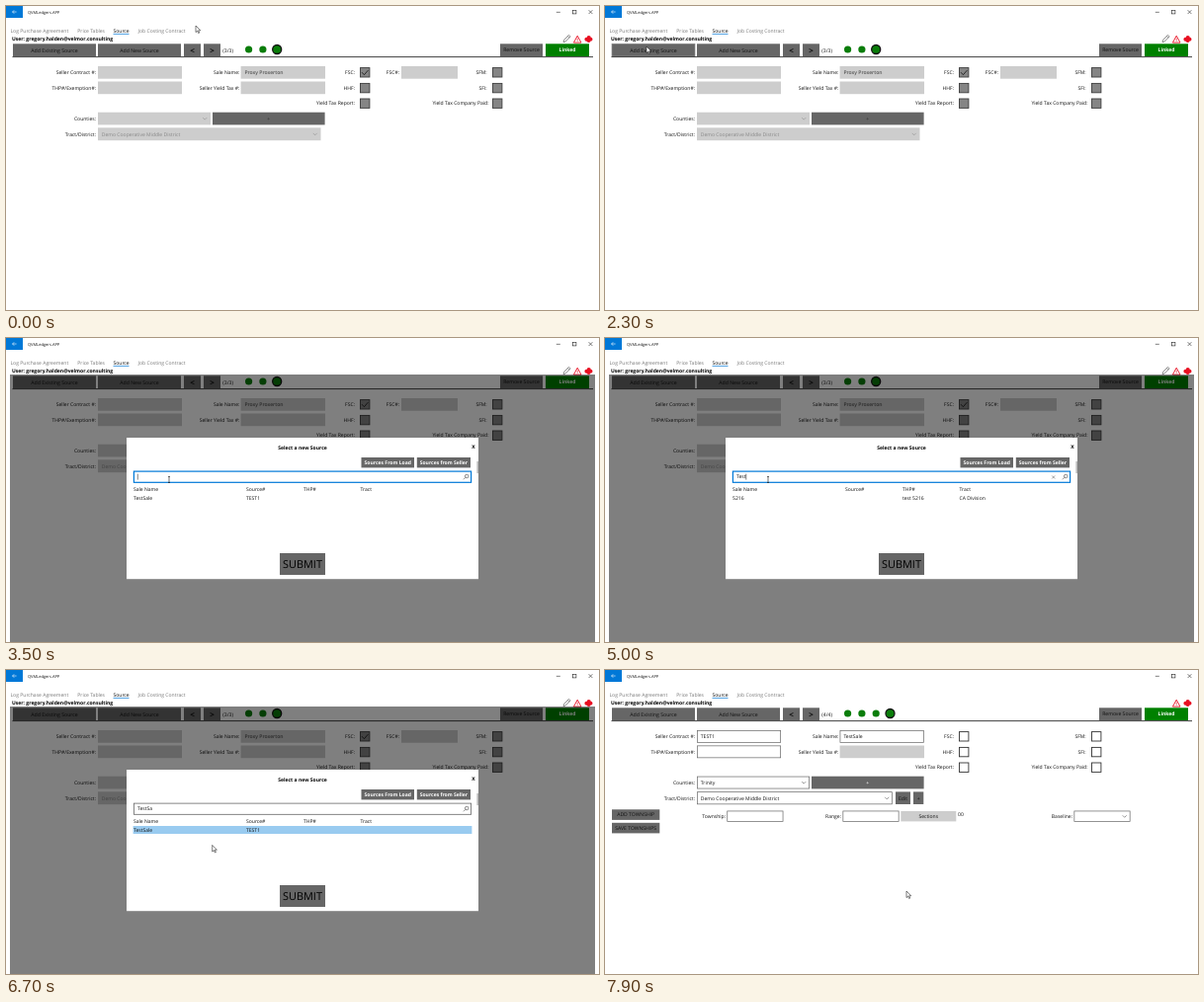
These frames come from a looping animation (600 px wide and 308 px high, 8000 ms). An HTML page:

```html
<!DOCTYPE html>
<html lang="en">
<head>
<meta charset="utf-8">
<title>Source form</title>
<style>
html, body { margin: 0; width: 100%; height: 100%; overflow: hidden; background: #fff; }
svg { display: block; width: 600px; height: 308px; }
text { font: 5.05px "Open Sans", "Noto Sans", sans-serif; text-rendering: geometricPrecision; white-space: pre; }
</style>
</head>
<body>
<svg id="stage" viewBox="0 0 600 308"></svg>
<script>
const NS = 'http://www.w3.org/2000/svg';
const stage = document.getElementById('stage');
const LOOP = 8000, STEP = 100;
const BTN = '#666', OFF = '#cdcdcd', BLUE = '#0078d7', GREEN = '#008000', RED = '#e81123';

function el(parent, tag, attrs) {
  const node = document.createElementNS(NS, tag);
  for (const k in attrs) node.setAttribute(k, attrs[k]);
  return parent.appendChild(node);
}
const group = (parent = stage) => el(parent, 'g', {});
const rect = (g, x, y, w, h, fill, stroke = 'none', sw = 0.7) =>
  el(g, 'rect', { x, y, width: w, height: h, fill, stroke, 'stroke-width': sw });
const path = (g, d, stroke, sw = 0.7, fill = 'none') =>
  el(g, 'path', { d, stroke, 'stroke-width': sw, fill });
const dot = (g, cx, cy, r, fill, stroke = 'none', sw = 0) =>
  el(g, 'circle', { cx, cy, r, fill, stroke, 'stroke-width': sw });

// y is the vertical middle of the line
function text(g, str, x, y, { size = 5.05, fill = '#111', weight = 400, anchor = 'start' } = {}) {
  const node = el(g, 'text', { x, y: y + size * 0.36, fill, 'text-anchor': anchor });
  node.style.fontSize = size + 'px';
  node.style.fontWeight = weight;
  node.textContent = str;
  return node;
}
const label = (g, str, x, y) => text(g, str, x, y, { anchor: 'end' });

function button(g, str, x, y, w, h, opt = {}, fill = BTN) {
  const box = rect(g, x, y, w, h, fill);
  text(g, str, x + w / 2, y + h / 2, { anchor: 'middle', ...opt });
  return box;
}
function field(g, x, y, w, h, on, str = '', opt = {}) {
  if (on) rect(g, x + 0.35, y + 0.35, w - 0.7, h - 0.7, '#fff', '#666');
  else rect(g, x, y, w, h, OFF);
  if (str) text(g, str, x + 3.8, y + h / 2, opt);
}
function select(g, x, y, w, h, on, str, opt) {
  field(g, x, y, w, h, on, str, opt);
  path(g, `M${x + w - 7.8} ${y + h / 2 - 0.9}l2 2l2 -2`, on ? '#444' : '#888', 0.55);
}
function check(g, x, y, on, ticked) {
  rect(g, x + 0.5, y - 4.6, 9.4, 9.4, on ? '#fff' : '#858585', on ? '#333' : '#3c3c3c', 0.9);
  if (ticked) path(g, `M${x + 2} ${y}l2.4 2.5l4 -4.6`, '#111', 0.8);
}

function drawChrome(g) {
  rect(g, 0, 0, 17, 12, BLUE);
  path(g, 'M10.6 6H6.6M8.2 4.3L6.5 6l1.7 1.7', '#fff', 0.6);
  text(g, 'QVMLedgers.APP', 22, 6.2, { size: 4 });
  path(g, 'M556.8 6.3h4', '#222', 0.6);
  rect(g, 573.3, 4.3, 3.6, 3.6, 'none', '#222', 0.6);
  path(g, 'M589.6 4.2l3.8 3.8M593.4 4.2l-3.8 3.8', '#222', 0.6);
  const grey = { fill: '#777' };
  text(g, 'Log Purchase Agreement', 4.5, 25.5, grey);
  text(g, 'Price Tables', 72.3, 25.5, grey);
  text(g, 'Source', 108.5, 25.5);
  text(g, 'Job Costing Contract', 133.7, 25.5, grey);
  path(g, 'M108.5 28.4h16', BLUE, 0.7);
  text(g, 'User: gregory.halden@velmor.consulting', 6, 33.4, { weight: 700, fill: '#000' });
  path(g, 'M578.2 30.2l3.8 6.9h-7.6z', RED, 0.9);
  path(g, 'M578.2 32.6v2.2M578.2 35.4v.7', RED, 0.7);
  [[587.4, 33.8, 2], [589.7, 32.2, 2.1], [591.6, 33.7, 1.9], [589.6, 35.1, 2]]
    .forEach(([x, y, r]) => dot(g, x, y, r, RED));
}

function drawForm(g, done) {
  const hover = button(g, 'Add Existing Source', 7, 38.3, 84, 12.7, { size: 5.2 });
  button(g, 'Add New Source', 93, 38.3, 84, 12.7, { size: 5.15 });
  button(g, '<', 180, 38.3, 17, 12.7, { size: 8, weight: 700 });
  button(g, '>', 200, 38.3, 17, 12.7, { size: 8, weight: 700 });
  const count = done ? 4 : 3;
  text(g, `(${count}/${count})`, 219.3, 44.7);
  for (let i = 0; i < count; i++) {
    const last = i === count - 1;
    dot(g, 245.6 + 14.3 * i, 44, last ? 4.5 : 3.6, '#0a7d0a', last ? '#111' : 'none', 1.3);
  }
  button(g, 'Remove Source', 500, 38.3, 43, 12.7, { size: 5.1 });
  button(g, 'Linked', 546, 38.3, 44, 12.7, { fill: '#fff', weight: 700 }, GREEN);
  path(g, 'M6.5 51.6H594', '#111', 0.8);

  label(g, 'Seller Contract #:', 91, 67.2);
  label(g, 'THP#/Exemption#:', 91, 83);
  label(g, 'Sale Name:', 236.4, 67.2);
  label(g, 'Seller Yield Tax #:', 236.4, 83);
  label(g, 'Counties:', 91, 114.3);
  label(g, 'Tract/District:', 91, 130);
  field(g, 93, 61, 85, 12.7, done, done ? 'TEST1' : '');
  field(g, 93, 76.5, 85, 12.7, done);
  if (done) field(g, 237.6, 61, 85.4, 12.7, true, 'TestSale');
  else field(g, 237.6, 61, 85.4, 12.7, false, 'Proxy Proxerton', { fill: '#555', weight: 600 });
  field(g, 237.6, 76.5, 85.4, 12.7, false);

  [['FSC:', 353, 67.2], ['HHF:', 353, 83], ['Yield Tax Report:', 353, 98.6],
   ['SFM:', 486.7, 67.2], ['SFI:', 486.7, 83], ['Yield Tax Company Paid:', 488.5, 98.6]]
    .forEach(([str, x, y], i) => {
      label(g, str, x, y);
      check(g, i < 3 ? 358 : 492, y, done, !done && i === 0);
    });
  if (!done) {
    label(g, 'FSC#:', 398, 67.2);
    field(g, 400, 61, 57, 12.7, false);
  }

  select(g, 93, 107.7, 114, 12.7, done, done ? 'Trinity' : '');
  button(g, '+', 209, 107.7, 113.6, 12.7, { fill: done ? '#fff' : '#333' });
  select(g, 93, 123.3, done ? 198 : 225.5, 12.9, done,
    'Demo Cooperative Middle District', { fill: done ? '#111' : '#888' });

  if (!done) {
    path(g, 'M564 36.6l.6 -2.2l5 -5l1.6 1.6l-5 5zM568.4 30.6l1.6 1.6', '#444', 0.6);
    return hover;
  }
  button(g, 'Edit', 294, 123.4, 15, 12.6);
  button(g, '+', 312, 123.4, 10.3, 12.6);
  button(g, 'ADD TOWNSHIP', 7, 141.3, 48.3, 10.6);
  button(g, 'SAVE TOWNSHIPS', 7, 154.8, 48.3, 10.6);
  label(g, 'Township:', 122, 148.4);
  field(g, 123.4, 142.6, 57, 11.2, true);
  label(g, 'Range:', 239, 148.4);
  field(g, 240.5, 142.6, 57, 11.2, true);
  button(g, 'Sections', 299.3, 143, 56, 10.4, {}, OFF);
  text(g, '00', 357, 146.4);
  label(g, 'Baseline:', 473, 148.4);
  select(g, 474.5, 142.6, 57, 11.2, true, '');
  return hover;
}

function drawDialog(g) {
  rect(g, 4, 37, 592, 271, 'rgba(0,0,0,.5)');
  rect(g, 122, 101, 356, 143.2, '#fff');
  rect(g, 476.4, 125, 1.6, 12, '#bbb');
  const bold = { weight: 700, fill: '#000' };
  text(g, 'Select a new Source', 300, 111.5, { ...bold, anchor: 'middle' });
  text(g, 'X', 473, 110, { ...bold, anchor: 'middle' });
  const light = { fill: '#fff', weight: 700 };
  button(g, 'Sources From Load', 359.5, 121, 53.5, 10.4, light);
  button(g, 'Sources from Seller', 415.8, 121, 54.2, 10.4, light);
  const box = rect(g, 129.4, 135.1, 341.2, 11.2, '#fff', '#666', 0.8);
  const query = text(g, '', 133, 140.6);
  const caret = path(g, '', '#000', 0.5);
  const clear = path(g, 'M452.2 139.5l3 3M455.2 139.5l-3 3', '#555', 0.55);
  dot(g, 466.2, 140, 1.8, 'none', '#444', 0.6);
  path(g, 'M464.9 141.3l-2 2', '#444', 0.6);
  const cols = [129, 243, 301, 358.5];
  ['Sale Name', 'Source#', 'THP#', 'Tract'].forEach((s, i) => text(g, s, cols[i], 153));
  const row = group(g);
  const rowBg = rect(row, 128.6, 158, 342.8, 8, 'none');
  const cells = cols.map(x => text(row, '', x, 162));
  const submit = button(g, 'SUBMIT', 277, 218, 46, 22, { size: 10.9, fill: '#000' });
  return { box, query, caret, clear, row, rowBg, cells, submit };
}

drawChrome(group());
const before = group(), after = group(), dialog = group(), pointer = group();
const addBtn = drawForm(before, false);
drawForm(after, true);
const ui = drawDialog(dialog);
const arrow = path(pointer, 'M0 0v6.6l1.6 -1.4l1.1 2.4l1 -.5l-1.1 -2.3h2.1z', '#111', 0.55, '#fff');
const beam = path(pointer, 'M-1 -3h2M0 -3v6M-1 3h2', '#111', 0.6);

// pointer stops: time, x, y
const stops = [
  [0, 192, 20], [1199, 192, 20], [1200, 317, 96], [1300, 317, 96], [1500, 268, 112],
  [2200, 42, 41], [2400, 42, 41], [3200, 165, 143.5], [5500, 165, 143.5], [6000, 166, 160.5],
  [6400, 166, 160.5], [7200, 301, 214], [7500, 305, 224], [LOOP, 305, 224]
];
const typed = [[4300, 'T'], [4400, 'Te'], [4600, 'Tes'], [4800, 'Test'], [5300, 'TestS'], [5500, 'TestSa']];

function pointerAt(t) {
  const i = stops.findIndex(s => s[0] > t);
  const [t0, x0, y0] = stops[i - 1], [t1, x1, y1] = stops[i];
  const p = (t - t0) / (t1 - t0), e = p * p * (3 - 2 * p);
  return [x0 + (x1 - x0) * e, y0 + (y1 - y0) * e];
}
const show = (node, on) => node.setAttribute('display', on ? 'inline' : 'none');
const inside = (x, y, l, t, r, b) => x >= l && x <= r && y >= t && y <= b;
function outline(node, on) {
  node.setAttribute('stroke', on ? '#858585' : 'none');
}

function render(t) {
  const [x, y] = pointerAt(t);
  const open = t >= 2400 && t < 7800;
  show(before, t < 7800);
  show(after, t >= 7800);
  show(dialog, open);

  const overBox = open && inside(x, y, 129, 135, 471, 146.5);
  pointer.setAttribute('transform', `translate(${x} ${y})`);
  show(arrow, !overBox);
  show(beam, overBox);
  outline(addBtn, !open && inside(x, y, 7, 38, 91, 51));
  outline(ui.submit, inside(x, y, 277, 218, 323, 240));

  const focus = t >= 3500 && t < 6300;
  const str = typed.reduce((s, [at, v]) => (t >= at ? v : s), '');
  ui.box.setAttribute('stroke', focus ? BLUE : '#666');
  ui.box.setAttribute('stroke-width', focus ? 1.2 : 0.8);
  ui.query.textContent = str;
  show(ui.clear, focus && str);
  show(ui.caret, focus && t < 5500);
  const end = 133.3 + (str ? ui.query.getComputedTextLength() : 0);
  ui.caret.setAttribute('d', `M${end} 137.6v6`);

  const other = t >= 5000 && t < 5700;
  const data = other ? ['5216', '', 'test 5216', 'CA Division'] : ['TestSale', 'TEST1', '', ''];
  ui.cells.forEach((c, i) => { c.textContent = data[i]; });
  const picked = t >= 6300, pressed = t >= 6100 && !picked;
  const over = open && inside(x, y, 129, 158, 471, 166);
  ui.rowBg.setAttribute('fill', picked ? '#99cbf0' : pressed ? '#cacaca' : over ? '#e6e6e6' : 'none');
  ui.row.setAttribute('transform', pressed
    ? 'translate(300 162) scale(.987 .97) translate(-300 -162)' : '');
}

let start = null;
function frame(now) {
  if (start === null) start = now;
  const t = (now - start) % LOOP;
  render(Math.floor(t / STEP) * STEP);
  requestAnimationFrame(frame);
}
render(0);
requestAnimationFrame(frame);
</script>
</body>
</html>
```
